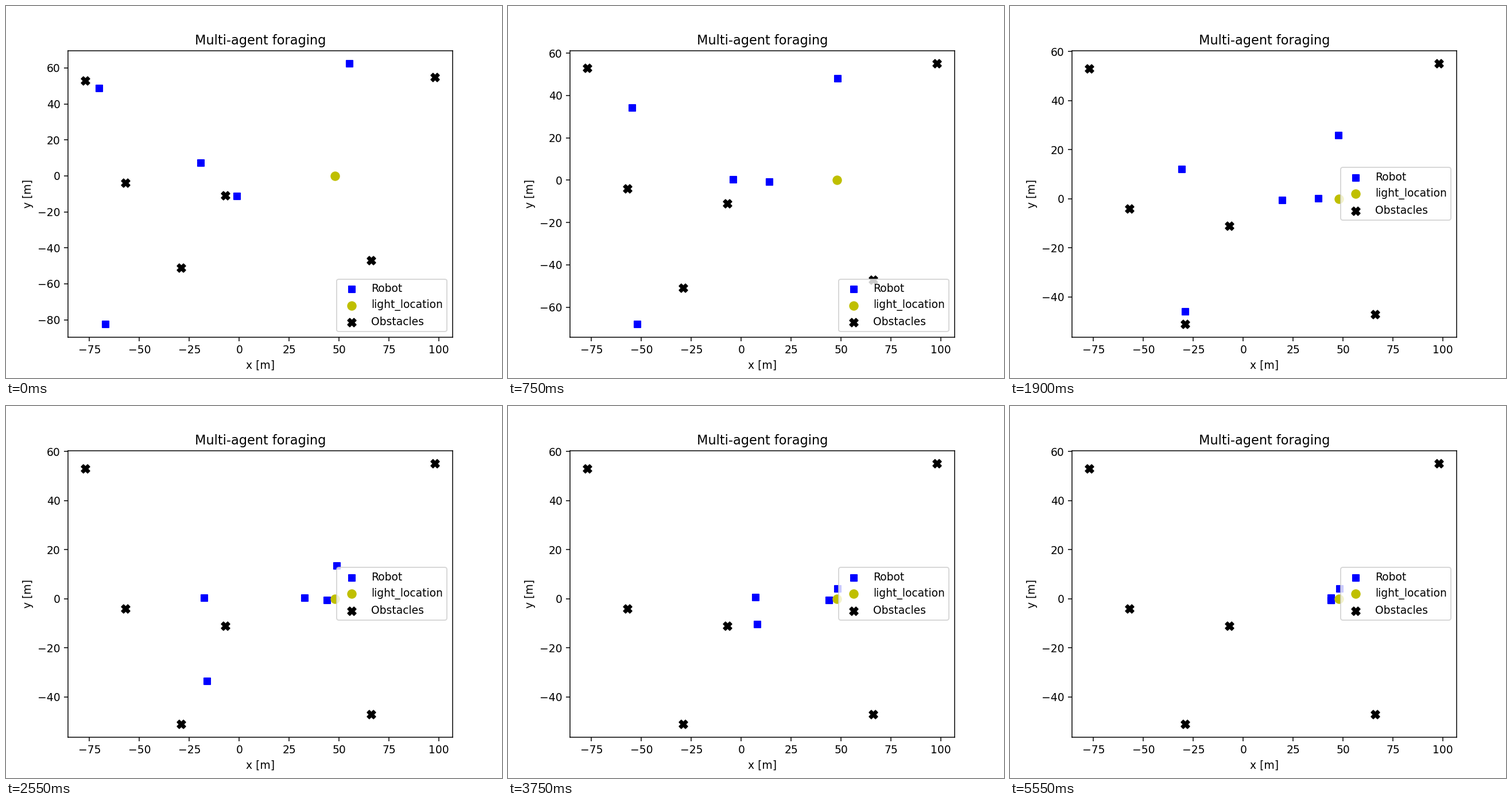
A matplotlib script that plays this animation: 864x648 px, repeating every 7.5 s.

```python
import numpy as np
import matplotlib.pyplot as plt
from matplotlib.animation import FuncAnimation

FRAMES, INTERVAL = 150, 50
LEGEND_MOVE = 16
LIGHT = np.array([48, 0])
STOP_DISTANCE = 4.1
PACE_Y = 0.96  # metres per frame
OBSTACLES = np.array([(-77, 53), (-57, -4), (-29, -51), (-7, -11), (66, -47), (98, 55)])

# Start x, start y and pace along x of each robot.
ROBOTS = [(-70.1, 48.7, 1.03), (55.1, 62.4, 1), (-19.3, 7.2, 1.02),
          (-1.1, -11.1, 1.015), (-67.2, -82.4, 1.003)]

rng = np.random.default_rng(4)


def robot_path(x, y, pace_x):
    """Approach the light on both axes, waver once level with it, then stop."""
    frames = np.arange(FRAMES)[:, None]
    offset = np.array([x, y]) - LIGHT
    side = np.sign(offset)
    gap = np.maximum(np.abs(offset) - frames * [pace_x, PACE_Y], 0)

    arrival = np.argmax(gap.max(axis=1) <= STOP_DISTANCE)
    gap[arrival, gap[arrival].argmax()] = STOP_DISTANCE

    waver = -(-1.0) ** frames * rng.uniform(0.2, 0.8, gap.shape)
    path = LIGHT + side * np.where(gap > 0, gap, waver)
    path[arrival:] = path[arrival]
    return path


def padded(values):
    low, high = np.min(values), np.max(values)
    margin = 0.05 * (high - low)
    return low - margin, high + margin


paths = np.stack([robot_path(*robot) for robot in ROBOTS], axis=1)

fig, ax = plt.subplots(figsize=(6.4, 4.8), dpi=135)
robots = ax.scatter(*paths[0].T, c="b", marker="s", label="Robot")
ax.scatter(*LIGHT, s=60, c="y", marker="o", label="light_location")
ax.scatter(*OBSTACLES.T, s=60, c="k", marker="X", label="Obstacles")
ax.set(title="Multi-agent foraging", xlabel="x [m]", ylabel="y [m]",
       xlim=padded(OBSTACLES[:, 0]))
legend = ax.legend(loc="lower right")

# Unsnapped squares keep their true size.
for squares in (robots, legend.legend_handles[0]):
    squares.set_snap(False)


def update(frame):
    positions = paths[frame]
    robots.set_offsets(positions)
    ax.set_ylim(padded(np.append(OBSTACLES[:, 1], positions[:, 1])))
    legend.set_loc("lower right" if frame < LEGEND_MOVE else "center right")


anim = FuncAnimation(fig, update, frames=FRAMES, interval=INTERVAL,
                     repeat=True, repeat_delay=0)
plt.show()
```
